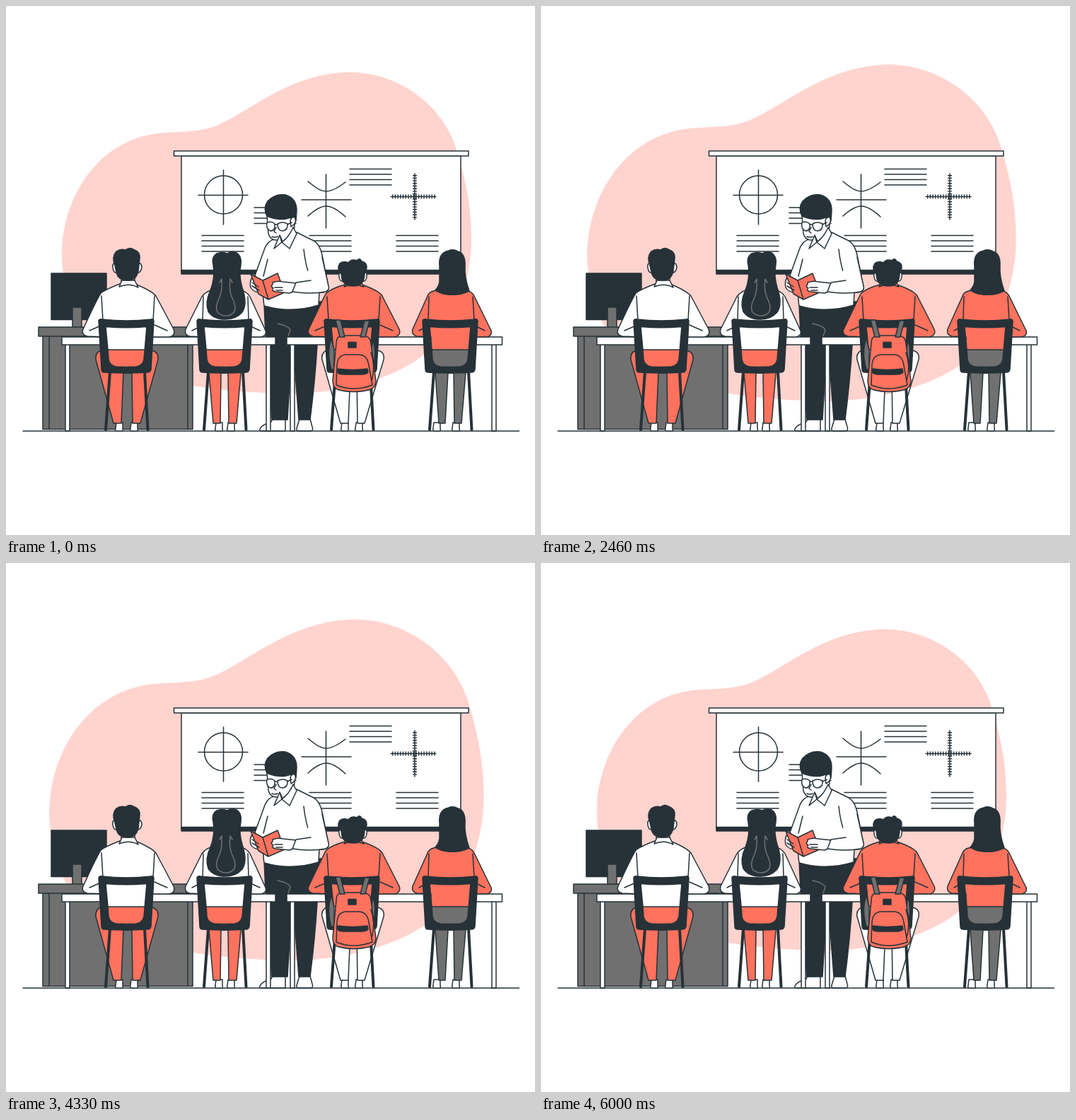
An HTML page without scripts that plays this animation: 748x748 px, repeating every 6.04 s.

```html
<!DOCTYPE html>
<html lang="en">
<head>
<meta charset="utf-8">
<title>Classroom</title>
<style>
html, body { margin: 0; width: 100%; height: 100%; overflow: hidden; background: #fff; }
svg { display: block; width: 100vw; height: 100vh; }
.scene { stroke: #263238; stroke-width: 1.5; stroke-linecap: round; stroke-linejoin: round; fill: none; }
.w { fill: #fff; }
.c { fill: #ff725e; }
.g { fill: #707070; }
.d { fill: #263238; }
.soft { stroke: #707070; }
.blob {
  fill: #ffd3ce;
  transform-origin: 368.5px 321px;
  animation: breathe 6040ms linear infinite;
}
/* 6 s of motion, then a 40 ms rest */
@keyframes breathe {
  0%, 59.6%, 99.34%, 100% { transform: scale(1); }
  19.87%, 79.47% { transform: scale(1.1); }
}
</style>
</head>
<body>
<svg viewBox="0 0 748 748">
<defs>
  <path id="rules" d="M0 0h59M0 7.5h59M0 15h59M0 22.5h59"/>
  <g id="chair">
    <path d="M-23 517L-29 599M26 517L30.500 599" stroke-width="4"/>
    <path class="d" fill-rule="evenodd" d="M-39 445Q-38 442 -34 443Q0 447 35 443Q39 442 39 446L35 514Q34 518 30 518Q0 520 -31 518Q-35 518 -35 514ZM-29 453.500L-26 485L-25 500Q-23 509 -14 510Q0 511 14 510Q23 509 25 500L29 453.500Q0 456 -29 453.500Z"/>
  </g>
  <path id="shoe" class="w" d="M-4 589L-5 597Q-6 601 -3 601H4Q6 601 5 597L5 589Z"/>
</defs>

<path class="blob" d="M485 93.500C558 94 617 142 636 200C652 250 658 290 658 332C657 385 640 445 592 492C548 528 470 549 395 548C350 547 310 544 264 537C190 528 115 480 96 435C85 408 79 380 79 350C80 270 130 190 215 180C250 177 275 179 300 168C350 146 400 96 485 93.500Z"/>

<g class="scene">
  <!-- board -->
  <path class="w" d="M248 212H643V376H248Z"/>
  <path class="d" d="M248 373.500H643V379H248Z"/>
  <path class="w" d="M237.500 205H654V212H237.500Z"/>
  <circle cx="307.500" cy="267" r="27"/>
  <path d="M307.500 232V309M272 267.500H342M452.500 238V314M418 274H488"/>
  <path d="M427 248C440 259 446 262 453 262S467 259 480 249M427 297C438 287 446 283 453 283S468 287 480 298"/>
  <path d="M544 269.500H608M578 237V302"/>
  <path stroke-width="6" stroke-dasharray="1.400 2.300" stroke-linecap="butt" d="M546 269.500H608M578 239V302"/>
  <use href="#rules" x="277" y="324.500"/>
  <use href="#rules" x="351" y="285"/>
  <use href="#rules" x="486" y="230.500"/>
  <use href="#rules" x="429" y="324.500"/>
  <use href="#rules" x="552" y="324.500"/>

  <!-- computer desk -->
  <path class="d" d="M64 378H142V443.500H64Z"/>
  <path class="g" d="M94 426H107V454H94ZM52 467H264V598.500H52ZM46 454H264V467H46Z"/>
  <path d="M61 467V598M257 467V598"/>

  <!-- teacher -->
  <path class="w" d="M377 584L375 588Q362 592 359 598Q358 601 362 601H395V584ZM415 584L411 597Q410 601 414 601H431Q435 600 433 595L430 584Z"/>
  <path class="d" d="M365 419Q367 480 376 585H398L405 468L414 585H430Q437 530 440 480L446 418Z"/>
  <path class="soft" d="M384 449Q399 452 402 458L399 467"/>
  <path class="w" d="M381 329Q369 332 365 345L352 381L364 398Q363 412 365 424Q403 435 442 423L443 405Q456 406 456 398L447 352Q443 334 431 330L411 320Z"/>
  <path d="M370 358L364 382M421 344Q423 365 431 388"/>
  <path class="w" d="M369 296L371 322Q374 332 384 331L388 326L391 333L407 319L409 300Z"/>
  <path class="w" d="M387 324L379 343L390 334L401 343L411 322L406 313Q400 327 390 334Z"/>
  <path class="d" d="M369 297Q363 286 370 276Q380 265 395 267Q411 272 411 289L410 304H405L403 299L396 301Q383 303 369 297Z"/>
  <path class="w" d="M402 303Q405 296 409 300Q411 308 403 312Z"/>
  <path class="w" d="M369 306Q376 304 380 308Q381 318 374 318Q367 315 369 306ZM384 308Q391 304 398 308Q399 317 391 318Q384 318 384 308Z"/>
  <path d="M380 309H384M398 309L404 306M382 313L379 319L382 321M376 326Q380 328 384 326"/>
  <path class="w" d="M348 384Q344 390 346 398Q350 405 360 405L365 398L357 387Z"/>
  <path class="c" d="M346 379L363 388L371 415L357 407ZM363 388L384 378L394 405L371 415Z"/>
  <path class="w" d="M377 394Q373 396 378 399Q374 402 381 404L401 406L406 404L411 392L392 390Q384 388 377 391Z"/>
  <path class="w" d="M410 391L405 404Q430 408 452 404Q458 401 456 396L447 355M410 391L431 388"/>
  <path d="M380 398L391 398M382 402L391 402M348 391L357 397M348 396L358 402"/>

  <!-- two tables -->
  <path class="w" d="M84 479H90V601H84ZM368 479H374V601H368ZM402 479H408V601H402ZM687 479H693V601H687ZM79 468H381V479H79ZM397 468H701.500V479H397Z"/>
  <path d="M24 601H725.500"/>

  <!-- student 1 -->
  <use href="#shoe" x="160"/><use href="#shoe" x="181"/>
  <path class="c" d="M137 478L136 487Q126 488 127 500L152 590H163L166 519H178L179 590H190L215 500Q216 489 206 487L204 478Z"/>
  <path class="w" d="M161 393Q145 399 135 405Q130 411 109 457Q106 465 115 467L141 468L140 486H201L203 468H231Q240 466 237 457L212 410Q206 403 185 394Z"/>
  <path d="M135 410L137 445M210 410L208 445M118 459L134 452M228 459L210 451"/>
  <path class="w" d="M163 378V392H182V378Z"/>
  <path class="w" d="M160 397L164 388H182L187 398Q174 391 160 397Z"/>
  <path class="w" d="M155 364Q150 363 151 370Q152 378 157 377ZM187 364Q192 363 192 370Q190 378 185 377Z"/>
  <path class="d" d="M154 367Q149 355 156 347Q162 343 169 345Q175 340 182 345Q190 348 189 357L187 375Q184 388 172 388Q158 388 156 376Z"/>
  <use href="#chair" x="170"/>

  <!-- student 2 -->
  <use href="#shoe" x="301"/><use href="#shoe" x="318"/>
  <path class="c" d="M276 478L281 514L287 519L293 590H303L304 519H314L315 590H326L332 519L340 510L343 478Z"/>
  <path class="w" d="M292 401Q282 404 277 411L254 457Q252 466 260 467L280 468L279 486H340L341 468H361Q369 466 367 459L345 411Q341 404 330 401Z"/>
  <path d="M279 411L278 444M342 411L343 444M263 459L275 453M359 459L346 453"/>
  <path class="d" d="M293 366Q290 355 298 350Q306 347 313 350Q318 346 326 349Q334 354 332 366Q329 381 334 398Q342 421 334 433Q325 443 311 443Q293 443 286 432Q281 419 289 402Q296 384 293 366Z"/>
  <path class="soft" d="M305 386Q306 402 302 412Q295 425 299 433Q304 438 311 438Q319 438 323 432Q326 424 319 411Q315 400 317 386M305 386L302 391M317 386L320 391"/>
  <use href="#chair" x="309"/>

  <!-- student 3 -->
  <use href="#shoe" x="479"/><use href="#shoe" x="499"/>
  <path class="w" d="M456 478V486Q445 489 447 500L473 590H484L487 519H496L497 590H507L534 500Q536 489 525 487V478Z"/>
  <path class="c" d="M479 394Q460 399 452 407L428 457Q425 465 434 467L460 468L459 486H520L522 468H550Q559 465 556 457L532 410Q527 402 503 394Z"/>
  <path d="M454 411L456 444M529 411L527 444M437 459L453 452M547 459L529 451"/>
  <path class="w" d="M482 381V394H500V381Z"/>
  <path class="c" d="M478 397L482 390H502L506 397Q492 391 478 397Z"/>
  <path class="w" d="M474 377Q470 376 471 383Q472 390 477 389ZM507 377Q511 376 510 383Q509 390 504 389Z"/>
  <path class="d" d="M474 379Q467 372 472 364Q477 360 484 363Q489 357 496 360Q500 355 503 361Q511 363 510 371L507 378Q507 396 492 396Q478 396 475 386Z"/>
  <use href="#chair" x="489"/>
  <path class="g" d="M460 470Q453 490 460 514L464 514V486ZM519 472Q524 490 520 505L516 488Z"/>
  <path class="c" d="M475 466Q467 467 467 477L462 530Q462 541 471 543Q491 548 513 543Q523 540 523 530L516 477Q515 467 506 466Z"/>
  <path class="g" d="M466 444H473L479 468H472ZM507 445H514L508 468H501Z"/>
  <path class="d" d="M484 475.500H495V483H484Z"/>
  <path d="M467 536L468 508Q469 494 480 493H500Q511 494 513 508L518 536Q491 546 467 536M516 490Q523 510 517 530"/>
  <path class="d" d="M469 513Q490 516 511 513L512 518Q509 521 502 521H478Q470 521 469 518Z"/>

  <!-- student 4 -->
  <use href="#shoe" x="609"/><use href="#shoe" x="636"/>
  <path class="g" d="M597 480L600 514L607 519L612 590H621L625 519H633L634 590H644L650 519L659 510L660 480Z"/>
  <path class="c" d="M610 402Q600 403 597 408L575 457Q573 465 581 467L601 468L600 486H658L659 468H680Q688 466 686 459L662 410Q659 404 651 402Z"/>
  <path d="M598 411L597 444M660 411L662 444M584 459L595 453M677 459L665 453"/>
  <path class="d" d="M613 368Q611 349 626 346Q632 343 639 347Q650 350 649 368Q648 383 655 403Q642 409 630 408Q617 409 607 402Q614 394 613 386Z"/>
  <use href="#chair" x="628"/>
</g>
</svg>
</body>
</html>
```
